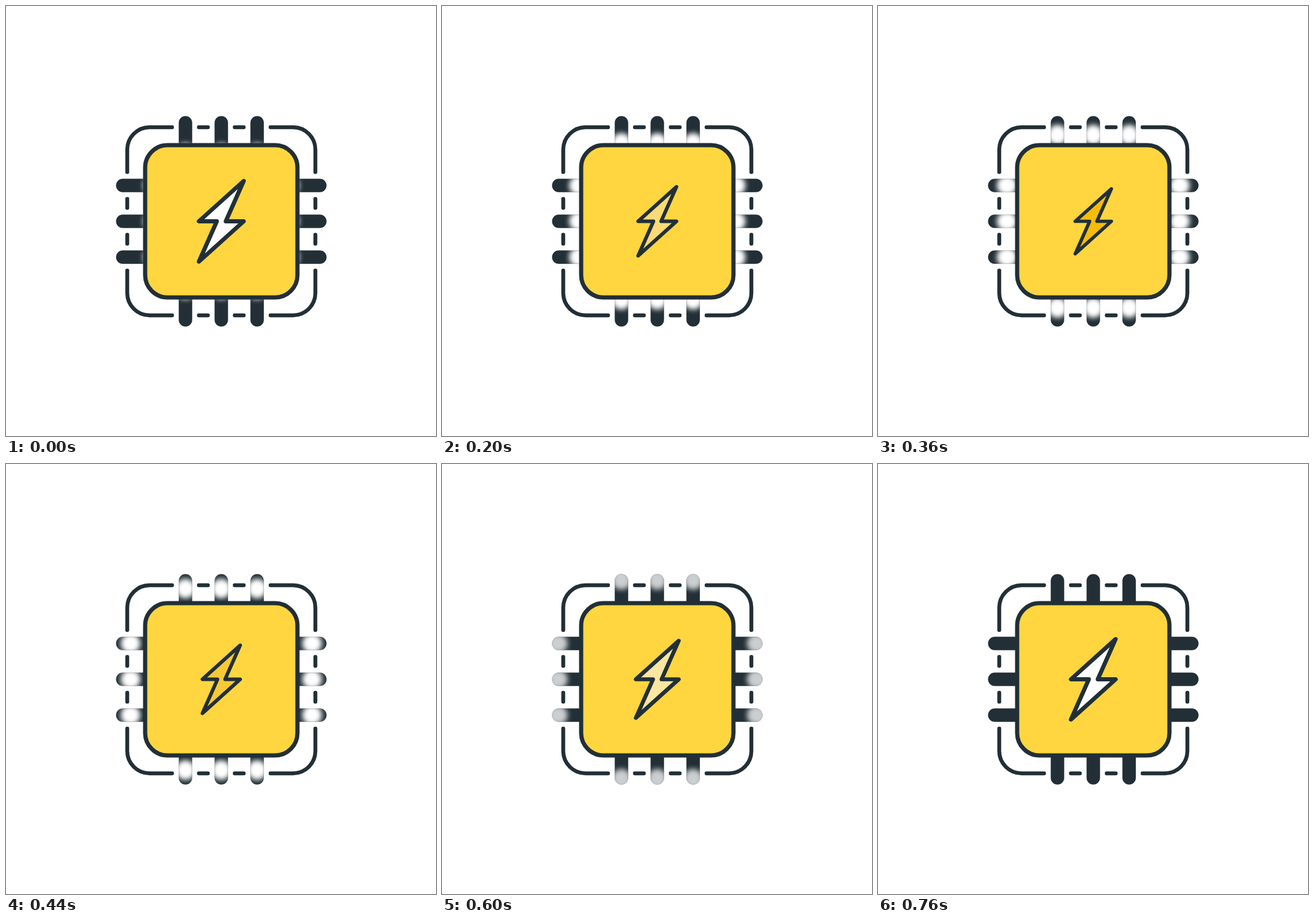
These frames come from a looping animation (720 by 720 pixels, 0.8 s). An HTML page:

```html
<!DOCTYPE html>
<html lang="en">
<head>
<meta charset="utf-8">
<title>Charging chip</title>
<style>
  html, body { margin: 0; width: 100%; height: 100%; overflow: hidden; background: #fff; }
  svg { display: block; width: 100%; height: 100%; }
  path, rect { fill: none; stroke: #222f36; stroke-linecap: round; stroke-linejoin: round; }
</style>
</head>
<body>
<svg viewBox="-360.5 -360.5 720 720">
  <defs>
    <path id="side" stroke-width="6.5"
      d="M-157.5-82.5V-120a37.5 37.5 0 0 1 37.5-37.5H-82.5M-37.5-157.5h15M22.5-157.5h15"/>
    <filter id="blur" filterUnits="userSpaceOnUse" x="-220" y="-220" width="440" height="440">
      <feGaussianBlur stdDeviation="4"/>
    </filter>
    <mask id="pinMask" maskUnits="userSpaceOnUse" x="-220" y="-220" width="440" height="440">
      <path class="pins" stroke-width="22.5" style="stroke:#fff"/>
    </mask>
  </defs>
  <use href="#side"/>
  <use href="#side" transform="rotate(90)"/>
  <use href="#side" transform="rotate(180)"/>
  <use href="#side" transform="rotate(270)"/>
  <path class="pins" stroke-width="22.5"/>
  <g mask="url(#pinMask)">
    <path id="glow" stroke-width="32" filter="url(#blur)" style="stroke:#fff"/>
  </g>
  <rect x="-127.5" y="-127.5" width="255" height="255" rx="37.5" stroke-width="7" style="fill:#ffd63f"/>
  <path id="bolt" stroke-width="7" d="M37.5-67.5L-37.5 0h30l-30 67.5L37.5 0h-30z"/>
</svg>
<script>
const LOOP = 800, STEP = 40;
const SMALLEST = 310, GROW = 420; // ms: when the bolt is smallest, and how long it grows back
const glow = document.getElementById('glow');
const bolt = document.getElementById('bolt');

const clamp = x => Math.min(1, Math.max(0, x));

// Twelve radial strokes, three per side, between two distances from the centre
function spokes(from, to) {
  return [-60, 0, 60].flatMap(p => [-1, 1].map(s =>
    `M${p} ${s * from}V${s * to}M${s * from} ${p}H${s * to}`)).join('');
}

function draw(t) {
  glow.setAttribute('d', spokes(107.5 + .1 * t, 114.5 + .086 * t));
  glow.style.opacity = 1 - clamp((t - 520) / 200) ** 1.6;

  const phase = (t - SMALLEST) / (t < SMALLEST ? SMALLEST : GROW);
  bolt.setAttribute('transform', `scale(${.9 - .1 * Math.cos(Math.PI * phase)})`);

  const tint = clamp(Math.min(t / 370, (740 - t) / 380));
  const mix = amber => Math.round(255 + (amber - 255) * tint);
  bolt.style.fill = `rgb(${mix(245)},${mix(186)},${mix(2)})`;
}

function tick() {
  draw(Math.floor(performance.now() % LOOP / STEP) * STEP);
  requestAnimationFrame(tick);
}

document.querySelectorAll('.pins').forEach(pins => pins.setAttribute('d', spokes(120, 165)));
tick();
</script>
</body>
</html>
```
